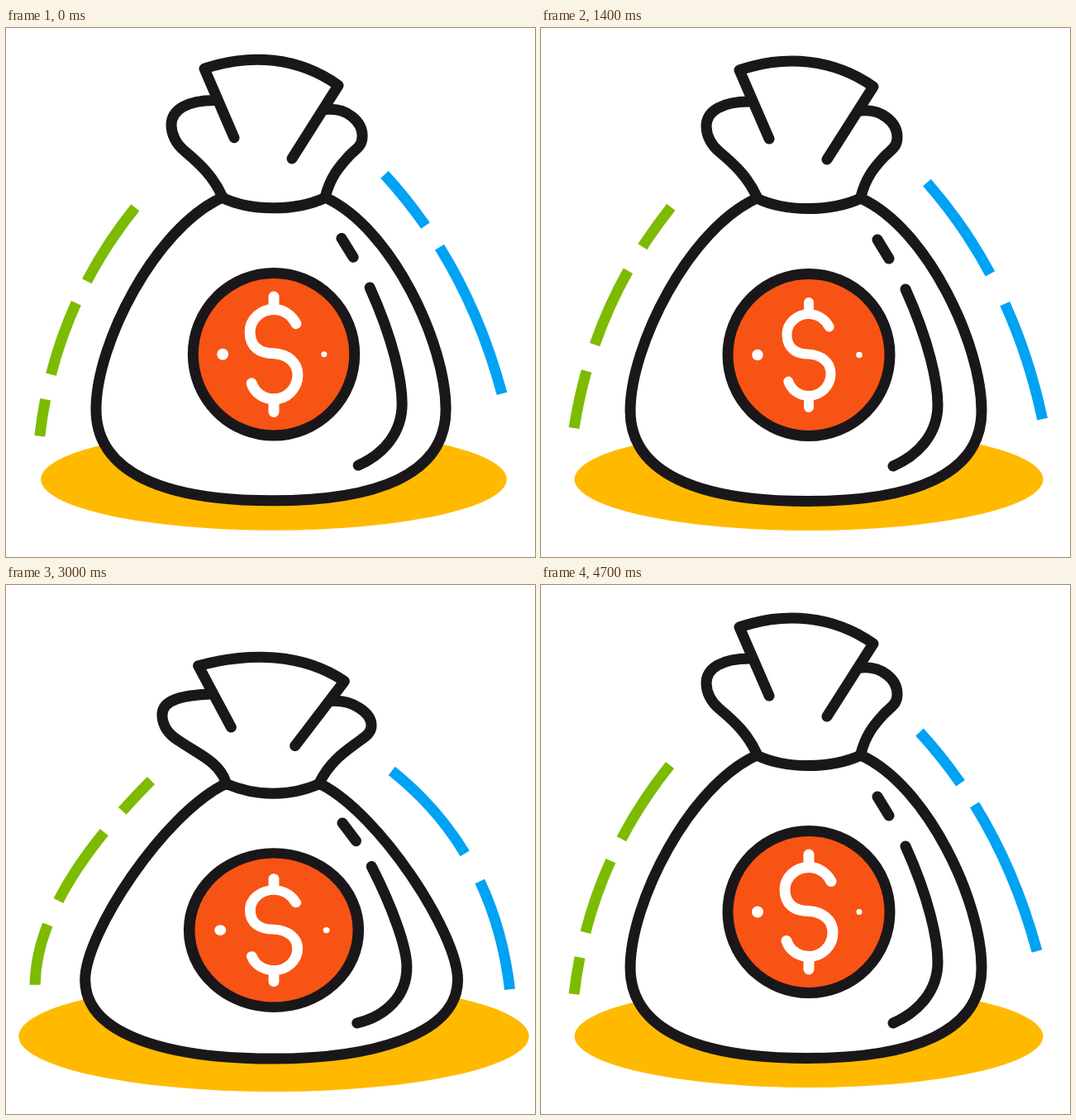
An HTML page that plays this animation: 640x640 px, repeating every 4800 ms.

```html
<!DOCTYPE html>
<html lang="en">
<head>
<meta charset="utf-8">
<title>Money bag</title>
<style>
  html, body { margin: 0; width: 100%; height: 100%; overflow: hidden; background: #fff; }
  svg { display: block; width: 100vw; height: 100vh; }
  path, circle { fill: none; stroke-width: 13; }
  .ink { stroke: #1a171b; stroke-linecap: round; stroke-linejoin: round; }
  .dollar { stroke: #fff; stroke-linecap: round; }
  .dot { fill: #fff; }
</style>
</head>
<body>
<svg viewBox="0 0 640 640">
  <ellipse id="shadow" fill="#ffba00"/>
  <path id="green" stroke="#7dbb00"/>
  <path id="blue" stroke="#00a2f3"/>
  <g class="ink">
    <path id="body" style="fill:#fff"/>
    <path id="leftFold"/>
    <path id="rightFold"/>
    <path id="cap"/>
    <path id="shine"/>
  </g>
  <g id="coin">
    <circle class="ink" r="98" style="fill:#f75314"/>
    <circle id="leftDot" class="dot" cx="-62"/>
    <circle id="rightDot" class="dot" cx="61"/>
    <path id="dollar" class="dollar" d="M0-69.5V-54M27-37C21-48 11-54 0-54C-16-54-29-42-29-27C-29-8-16-1 0-1C16 0 29 9 29 25C29 41 16 54 0 54C-12 54-23 47-27 35M0 54V69.5"/>
  </g>
</svg>
<script>
const LOOP = 4800, STEP = 100, LEAD = 50;
const $ = id => document.getElementById(id);

// Each shape: rest, stretched, squashed
const bag = {
  body: [
    'M261 206C179 243 108 385 108 463C108 538 189 572.5 322 572.5C450 572.5 533 541 533 463C533 384 468 243 387 206C350 222.7 296 222.7 261 206Z',
    'M267 193C197 229 124 345 124 434C124 530 209 560 322 560C425 560 518 535 518 434C518 345 446 228 379 193C346 211.7 302 211.7 267 193Z',
    'M265 234C188 271 98 415 98 475C98 545 200 573 323 573C440 573 544 545 544 475C544 415 455 270 381 234C345 250 302 250 265 234Z'],
  leftFold: [
    'M252 89C220 89 200 100 200 119C200 130 206 142 216 150C234 165 250 180 261 204',
    'M253 63C218 64 200 76 200 95C200 108 206 121 216 129C237 150 260 167 267 191',
    'M248 124C216 125 191 131 191 150C191 163 199 174 210 181C232 197 256 207 265 232'],
  rightFold: [
    'M388 100C412 98 431 114 431 132C431 145 423 147 414 157C403 169 393 181 387 204',
    'M388 76C414 74 432 92 432 110C432 124 424 128 414 138C402 152 386 172 379 191',
    'M392 133C418 131 440 147 440 163C440 174 430 178 422 185C408 196 392 208 381 232'],
  cap: [
    'M276 134L240 51C295 32 354 37 402 71L346 159',
    'M276 114L240 22C295 1 354 6 402 45L346 141',
    'M273 165L234 89C295 72 358 74 408 108L349 188'],
  shine: [
    'M407 256L421 279M441 316C470 380 480 430 480 456C480 490 458 516 426 530',
    'M389 230L407 251M427 282C455 345 466 395 466 433C466 472 455 503 429 515',
    'M407 282L423 304M442 336C468 388 484 437 484 461C484 497 458 521 425 530']
};

// Each line: rest, stretched, squashed, swung
const lines = {
  green: {
    poses: ['M156 218Q58 340 40 495', 'M161 206Q66.5 323.5 53.5 475.5',
      'M170.5 234.5Q35 375 36 497', 'M158 216Q66 332 40 478.5'],
    dashes: ['107 29.5 92 31 45', '107 29.5 92 31 45',
      '110 28.5 92 29 43', '34.5 36.2 101.5 34.7 84']
  },
  blue: {
    poses: ['M458 178Q558 287 600 443', 'M458 166Q558 275 600 431',
      'M456 207Q571 298 601 450', 'M471.5 191.5Q577.5 315 610 488.5'],
    dashes: ['79 31 193', '79 31 193', '73 29 200', '164 45.5 124']
  }
};

const shadow = ['324 546 283.5 62', '324 547 256 56', '324 546 304 66'];
const coin = ['324 395.5 1 1', '324 383 .947 1.043', '324 413.5 1.036 .96'];

const NUMBER = /\d*\.?\d+/g;
const numbers = text => text.match(NUMBER).map(Number);

// Add weighted differences from the rest pose to every number in it
function mix(poses, weights) {
  const [rest, ...others] = poses.map(numbers);
  let i = 0;
  return poses[0].replace(NUMBER, () => {
    const sum = others.reduce((v, p, k) => v + weights[k] * (p[i] - rest[i]), rest[i]);
    i++;
    return sum.toFixed(3);
  });
}

function ramp(t, from, to) {
  const u = Math.min(1, Math.max(0, (t - from) / (to - from)));
  return u * u * (3 - 2 * u);
}

const wave = (t, period) => (1 + Math.cos(2 * Math.PI * t / period)) / 2;

function draw(time) {
  const t = time + LEAD, hop = t % 2400;
  const land = ramp(hop, 335, 600);
  const stretch = ramp(hop, 0, 335) - land;
  const squash = 1.26 * (land - ramp(hop, 600, 1125));
  const swing = 1 - wave(t, LOOP);
  const pose = [stretch, squash], linePose = [...pose, swing];

  for (const id in bag) $(id).setAttribute('d', mix(bag[id], pose));

  for (const id in lines) {
    const dashes = mix(lines[id].dashes, linePose);
    $(id).setAttribute('d', mix(lines[id].poses, linePose));
    $(id).setAttribute('pathLength', numbers(dashes).reduce((a, b) => a + b));
    $(id).setAttribute('stroke-dasharray', dashes);
  }

  const oval = numbers(mix(shadow, pose));
  ['cx', 'cy', 'rx', 'ry'].forEach((name, i) => $('shadow').setAttribute(name, oval[i]));

  const [x, y, sx, sy] = numbers(mix(coin, pose));
  $('coin').setAttribute('transform', `translate(${x} ${y}) scale(${sx} ${sy})`);
  $('dollar').setAttribute('transform', `scale(${0.905 + 0.095 * wave(t, 2400)})`);

  const blink = 3.5 * wave(t, 1600);
  $('leftDot').setAttribute('r', 3.5 + blink);
  $('rightDot').setAttribute('r', 7 - blink);
}

const start = performance.now();
function tick() {
  const elapsed = performance.now() - start + 15;
  draw(Math.floor(elapsed / STEP) * STEP % LOOP);
  requestAnimationFrame(tick);
}
tick();
</script>
</body>
</html>
```
